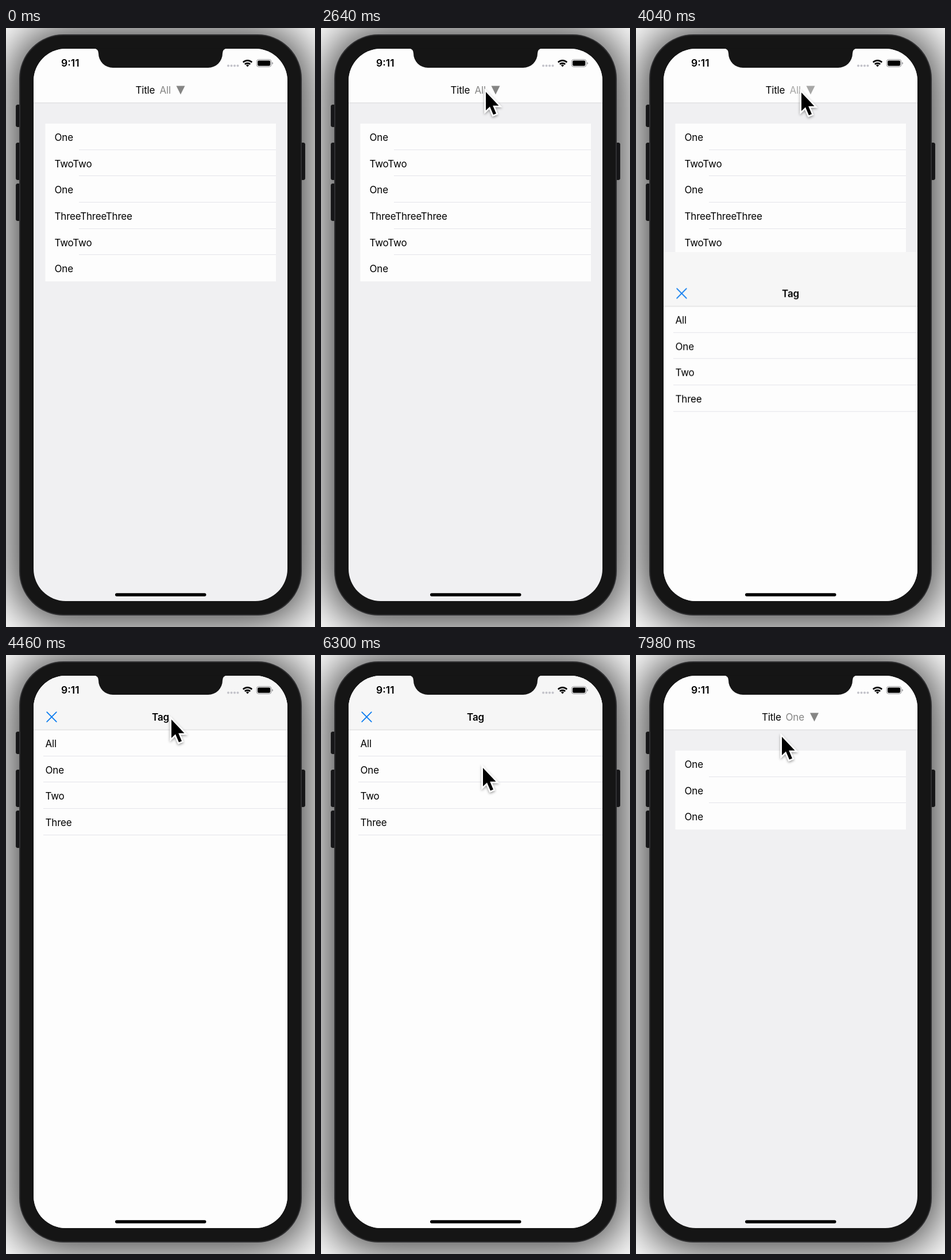
An HTML page that plays this animation: 538 by 1040 pixels, repeating every 8000 ms.

```html
<!DOCTYPE html>
<html lang="en">
<head>
<meta charset="utf-8">
<title>Tag filter</title>
<style>
  html, body { margin: 0; width: 100%; height: 100%; overflow: hidden; background: #fff; }
  body { position: relative; }
  .body, .key { position: absolute; box-sizing: border-box; }
  .body {
    left: 23px; top: 11px; width: 492px; height: 1009px; border-radius: 77px;
    background: #151515; border: 2px solid #303032;
    box-shadow: 0 2px 76px 16px rgba(0, 0, 0, .72);
  }
  .key { width: 9px; border-radius: 3px; background: #29292c; border: 1px solid #363638; }
  svg { position: absolute; left: 0; top: 0; width: 538px; height: 1040px; }
  text { font: 400 17px Inter, Roboto, sans-serif; letter-spacing: -.2px; fill: #000; }
  .bold { font-weight: 600; }
  .line { fill: #e4e4ea; }
  .edge { fill: #d8d8da; }
  .grey, .grey text { fill: #858584; }

  .all, .one, .sheet, .grey, .cursor { animation: 8s linear infinite; }
  .all { animation-name: all; }
  .one { animation-name: one; }
  .sheet { animation-name: sheet; }
  .all .grey { animation-name: press; }
  .cursor { animation-name: cursor; }

  @keyframes all { 0%, 81.24% { opacity: 1 } 81.25%, 100% { opacity: 0 } }
  @keyframes one { 0%, 81.24% { opacity: 0 } 81.25%, 100% { opacity: 1 } }
  @keyframes press {
    0%, 47.5% { opacity: 1 }
    47.6%, 48.8% { opacity: .3 }
    50.5% { opacity: .72 }
    52.5%, 100% { opacity: 1 }
  }
  @keyframes sheet {
    0%, 48.775% { transform: translateY(959px); animation-timing-function: cubic-bezier(.25, .5, .25, 1) }
    55.025% { transform: translateY(0) }
    86.36% { transform: translateY(0); animation-timing-function: cubic-bezier(.25, .5, .25, 1) }
    92.61%, 100% { transform: translateY(959px) }
  }
  @keyframes cursor {
    0%, 6.5% { transform: translate(560px, 330px); animation-timing-function: ease-out }
    15.5%, 19% { transform: translate(280px, 104px); animation-timing-function: ease-in-out }
    26%, 33% { transform: translate(287px, 111px) }
    42%, 57% { transform: translate(288px, 112px); animation-timing-function: ease-in-out }
    63.25% { transform: translate(287px, 145px); animation-timing-function: ease-out }
    72%, 89% { transform: translate(282px, 196px); animation-timing-function: ease-in-out }
    98%, 100% { transform: translate(254px, 142px) }
  }
</style>
</head>
<body>
<div class="key" style="left:17px;top:133px;height:39px"></div>
<div class="key" style="left:17px;top:199px;height:65px"></div>
<div class="key" style="left:17px;top:270px;height:65px"></div>
<div class="key" style="left:512px;top:199px;height:65px"></div>
<div class="body"></div>

<svg viewBox="0 0 538 1040">
  <defs>
    <clipPath id="screen"><rect x="48" y="36" width="442" height="959" rx="56"/></clipPath>
    <filter id="shade" x="-50%" y="-50%" width="200%" height="200%">
      <feDropShadow dx="0" dy="2" stdDeviation="2" flood-color="#000" flood-opacity=".4"/>
    </filter>
  </defs>

  <g clip-path="url(#screen)">
    <rect x="48" y="36" width="442" height="959" fill="#f0f0f2"/>
    <rect x="48" y="36" width="442" height="94" fill="#fdfdfd"/>
    <rect class="edge" x="48" y="129.5" width="442" height="1"/>

    <g class="all">
      <text x="225.5" y="114">Title</text>
      <g class="grey"><text x="267.5" y="114">All</text><path d="M296.5 100.5h15l-7.5 15z"/></g>
      <g id="allRows"></g>
    </g>
    <g class="one">
      <text x="219" y="114">Title</text>
      <g class="grey"><text x="260.5" y="114">One</text><path d="M303 100.5h15l-7.5 15z"/></g>
      <g id="oneRows"></g>
    </g>

    <g class="sheet">
      <rect x="48" y="36" width="442" height="959" fill="#fdfdfd"/>
      <rect x="48" y="36" width="442" height="94" fill="#f6f6f6"/>
      <rect class="edge" x="48" y="129.5" width="442" height="1"/>
      <path d="M71.2 99.2l16.6 16.6M87.8 99.2l-16.6 16.6" stroke="#0a7bf0" stroke-width="1.8" stroke-linecap="round"/>
      <text class="bold" x="269" y="113.5" text-anchor="middle">Tag</text>
      <g id="tagRows"></g>
    </g>

    <text class="bold" x="96" y="67" style="font-size:17.5px;letter-spacing:0">9:11</text>
    <g fill="#c3c3ca">
      <circle cx="387" cy="65.5" r="2"/><circle cx="392.5" cy="65.5" r="2"/>
      <circle cx="398" cy="65.5" r="2"/><circle cx="403.5" cy="65.5" r="2"/>
    </g>
    <g fill="none" stroke="#000" stroke-width="2.7">
      <path d="M412.8 59.6a11 11 0 0 1 15.4 0M415.8 63a6.7 6.7 0 0 1 9.4 0"/>
      <path d="M420.5 67.6l-2.6-2.8a3.7 3.7 0 0 1 5.2 0z" fill="#000" stroke="none"/>
    </g>
    <rect x="436.3" y="54.8" width="25.6" height="12.6" rx="3.6" fill="none" stroke="#8f8f92"/>
    <rect x="438" y="56.4" width="22.2" height="9.4" rx="2.2"/>
    <path d="M463.3 59v4.4q1.6-.6 1.6-2.2t-1.6-2.2z" fill="#8f8f92"/>
    <rect x="190" y="981.3" width="158.5" height="5.4" rx="2.7"/>
  </g>

  <path d="M153 35.500q8 .5 8 8.500a25 25 0 0 0 25 25h166a25 25 0 0 0 25-25q0-8 8-8.500z" fill="#151515"/>

  <g class="cursor">
    <path d="M0 0V32L7 25.500L13 39.500L18 37.500L12.200 23.800H22.500z" filter="url(#shade)"
      stroke="#fff" stroke-width="5" stroke-linejoin="miter" paint-order="stroke"/>
  </g>
</svg>

<script>
  const ROW = 45.65;

  function list(id, labels, { top, textX, lineX, right, card }) {
    const box = card
      ? `<rect x="68.5" y="${top}" width="401.5" height="${labels.length * ROW}" fill="#fdfdfd"/>` : '';
    const rows = labels.map((label, i) => {
      const y = top + i * ROW;
      const last = card && i === labels.length - 1;
      const line = last ? ''
        : `<rect class="line" x="${lineX}" y="${Math.round(y + ROW) - 1}" width="${right - lineX}" height="1"/>`;
      return `<text x="${textX}" y="${y + 30}">${label}</text>${line}`;
    });
    document.getElementById(id).innerHTML = box + rows.join('');
  }

  const grouped = { top: 166, textX: 84.5, lineX: 127, right: 470, card: true };
  list('allRows', ['One', 'TwoTwo', 'One', 'ThreeThreeThree', 'TwoTwo', 'One'], grouped);
  list('oneRows', ['One', 'One', 'One'], grouped);
  list('tagRows', ['All', 'One', 'Two', 'Three'], { top: 130, textX: 68.5, lineX: 65, right: 490 });
</script>
</body>
</html>
```
